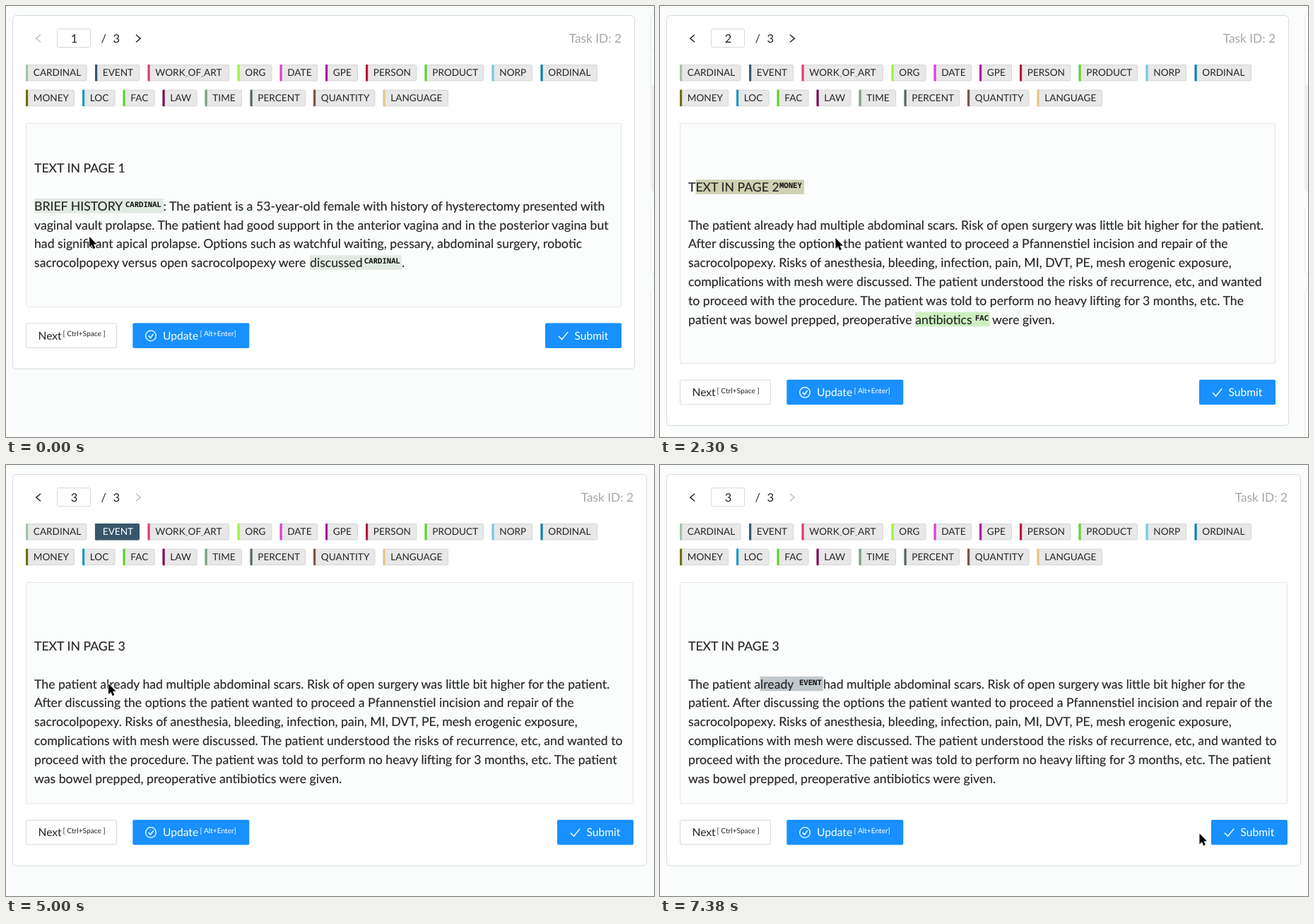
An HTML page for the animation above (7.46 s loop, 917 px wide and 611 px high).

```html
<!DOCTYPE html>
<html lang="en">
<head>
<meta charset="utf-8">
<title>Page annotation</title>
<style>
  html, body { margin: 0; width: 100%; height: 100%; overflow: hidden; background: #fafcfc; }
  svg { display: block; width: 100%; height: 100%; }
  text { font-family: Lato, sans-serif; fill: #262626; text-rendering: geometricPrecision; white-space: pre; }
  .body { font-size: 17.67px; stroke: #262626; stroke-width: .15; }
  .tag { font-size: 13.6px; }
  .tag tspan { font-size: .62em; }
  .btn { font-size: 15.6px; }
  .key { font-size: 10.2px; }
  .num { font-size: 16.5px; }
  .task { font-size: 17.3px; fill: #a6a6a6; text-anchor: end; }
  .sup { font: 600 10.6px "Noto Sans Mono", "DejaVu Sans Mono", monospace; fill: #111; }
  .light { fill: #fff; }
  .line { fill: none; stroke-width: 1.5; }
</style>
</head>
<body>
<svg id="stage" viewBox="0 0 917 611" xmlns="http://www.w3.org/2000/svg"></svg>
<script>
const LOOP = 7460, STEP = 50;

// name, colour, left, right
const TAG_ROWS = [
  [["CARDINAL", "#a3c5a5", 28, 114.5], ["EVENT", "#39566b", 126, 189], ["WORK_OF_ART", "#d8436f", 200.5, 316],
   ["ORG", "#a0f53c", 327.5, 376.5], ["DATE", "#e040d0", 387.5, 441], ["GPE", "#a81c9c", 452, 498],
   ["PERSON", "#b3163f", 509, 581.5], ["PRODUCT", "#62d42f", 592.5, 676], ["NORP", "#7cc8e8", 687.5, 745],
   ["ORDINAL", "#0f84a8", 756.5, 837]],
  [["MONEY", "#6f7009", 28, 97], ["LOC", "#1e9bc8", 108, 154.5], ["FAC", "#62d430", 165.5, 210.5],
   ["LAW", "#7a1258", 221.5, 270.5], ["TIME", "#7ba080", 281.5, 334], ["PERCENT", "#556b58", 345.5, 424],
   ["QUANTITY", "#7d5847", 435, 522.5], ["LANGUAGE", "#e4c983", 533.5, 626]]
];

const PAGES = [{ right: 871, bottom: 426.5 }, { right: 871, bottom: 506.8 }, { right: 888, bottom: 480 }];

const text = (x, y, s, cls = "body") => `<text x="${x}" y="${y}" class="${cls}">${s}</text>`;
const rect = (x, y, w, h, fill, stroke = "none", r = 0, extra = "") =>
  `<rect x="${x}" y="${y}" width="${w}" height="${h}" fill="${fill}" stroke="${stroke}" rx="${r}" ${extra}/>`;
const line = (d, color) => `<path class="line" d="${d}" stroke="${color}"/>`;
const row = n => 236.2 + 26.8 * n;
const lines = (first, list) => list.map((s, i) => text(40, row(first + i), s)).join("");
const mark = (x, end, n, color) => rect(x, row(n) - 16.8, end - x, 20.6, color);
const sup = (x, n, s) => text(x, row(n) - 5, s, "sup");

function tag([name, color, x, end], y) {
  return rect(x + .5, y + .5, end - x - 1, 22.5, "#e8e8e8", "#d6d6d6", 1.5) +
    rect(x, y, 3.2, 23.5, color) +
    text(x + 10.8, y + 16.2, name.replaceAll("_", "<tspan>_</tspan>"), "tag");
}

function frame(i) {
  const { right: R, bottom: B } = PAGES[i];
  const y = B + 23;
  const arrow = on => on ? "#222" : "#bcbcbc";
  return rect(9.5, 13.5, R + 9, B + 74.5, "#fff", "#d6dbdc", 5) +
    line("M49 40.8L42.8 46L49 51.2", arrow(i > 0)) +
    line("M184 40.8L190.2 46L184 51.2", arrow(i < 2)) +
    rect(72.5, 32.5, 47, 26, "#fff", "#d9d9d9", 2) +
    text(91.7, 52, i + 1, "num") + text(134.5, 52, "/", "num") + text(151.5, 52, "3", "num") +
    text(R, 52, "Task ID: 2", "task") +
    TAG_ROWS.map((tags, r) => tags.map(t => tag(t, 83 + 35.7 * r)).join("")).join("") +
    rect(28.5, 166.5, R - 29, B - 166.5, "#fbfcfc", "#e4e7e8", 2) +
    rect(28.5, y + .5, 128, 34.5, "#fff", "#d9d9d9", 2) +
    text(45.5, y + 23.2, "Next", "btn") + text(80.5, y + 18.8, "[ Ctrl+Space ]", "key") +
    rect(179.3, y, 165, 35.5, "#1890ff", "none", 2, 'class="update"') +
    `<circle class="line" cx="205" cy="${y + 18}" r="7.3" stroke="#fff" style="stroke-width:1.3"/>` +
    line(`M201.8 ${y + 18}l2.6 3l4.2 -5.6`, "#fff") +
    text(222, y + 23.2, "Update", "btn light") + text(274.5, y + 18.8, "[ Alt+Enter]", "key light") +
    rect(R - 108, y, 108, 35.5, "#1890ff", "none", 2) +
    line(`M${R - 89} ${y + 18.4}l4.6 4.8l8.6 -10.6`, "#fff") +
    text(R - 66.5, y + 23.2, "Submit", "btn light");
}

const sidebar =
  rect(913, 13.5, 20, 249, "#fff", "#e2e6e6", 3) + rect(914, 60, 9, 1, "#ececec") +
  rect(913.5, 112, 9, 150, "#ededed") +
  rect(913, 286, 20, 92, "#fff", "#e6e9e9", 3) +
  rect(913, 402, 20, 230, "#fff", "#e6e9e9", 3) + rect(914, 447, 9, 1, "#ececec");

const SHARED = [
  "sacrocolpopexy. Risks of anesthesia, bleeding, infection, pain, MI, DVT, PE, mesh erogenic exposure,",
  "complications with mesh were discussed. The patient understood the risks of recurrence, etc, and wanted"
];
const OPENING = [
  "The patient already had multiple abdominal scars. Risk of open surgery was little bit higher for the patient.",
  "After discussing the options the patient wanted to proceed a Pfannenstiel incision and repair of the"
];

const page1 = sidebar + frame(0) +
  mark(40, 223, 2, "#e1ebe3") + mark(430, 560, 5, "#e1ebe3") +
  text(40, row(0), "TEXT IN PAGE 1") + text(40, row(2), "BRIEF HISTORY") + sup(169, 2, "CARDINAL") +
  text(222.5, row(2), ": The patient is a 53-year-old female with history of hysterectomy presented with") +
  lines(3, [
    "vaginal vault prolapse. The patient had good support in the anterior vagina and in the posterior vagina but",
    "had significant apical prolapse. Options such as watchful waiting, pessary, abdominal surgery, robotic",
    "sacrocolpopexy versus open sacrocolpopexy were "]) +
  text(430, row(5), "discussed") + sup(507, 5, "CARDINAL") + text(560, row(5), ".");

const page2 = sidebar + frame(1) +
  mark(50.5, 204, 1, "#cfd1b3") + mark(361, 466.5, 8, "#cdf0c0") +
  text(40, row(1), "TEXT IN PAGE 2") + sup(169, 1, "MONEY") +
  lines(3, [...OPENING, SHARED[0], SHARED[1],
    "to proceed with the procedure. The patient was told to perform no heavy lifting for 3 months, etc. The",
    "patient was bowel prepped, preoperative"]) +
  text(361.3, row(8), "antibiotics") + sup(446, 8, "FAC") + text(470, row(8), "were given.");

const page3 = frame(2) + text(40, row(1), "TEXT IN PAGE 3") +
  lines(5, [SHARED[0], SHARED[1] + " to",
    "proceed with the procedure. The patient was told to perform no heavy lifting for 3 months, etc. The patient",
    "was bowel prepped, preoperative antibiotics were given."]) +
  `<g id="plain"><rect id="select" x="141.5" y="${row(3) - 17}" height="21" fill="#b4d5fe"/>${lines(3, OPENING)}</g>` +
  `<g id="labelled">${mark(141.5, 231, 3, "#c0c8cc")}${text(40, row(3), "The patient already")}${sup(197, 3, "EVENT")}` +
  text(231, row(3), "had multiple abdominal scars. Risk of open surgery was little bit higher for the") +
  text(40, row(4), "patient. After discussing the options the patient wanted to proceed a Pfannenstiel incision and repair of the") +
  `</g><g id="chosen">${rect(124.5, 82, 66, 26, "#39566b", "none", 4, 'opacity=".08"')}` +
  rect(126, 83, 63, 23.5, "#39566b", "none", 2) + text(136.8, 99.2, "EVENT", "tag light") + "</g>";

const dots = [[-10, -10], [10, -10], [10, 10], [-10, 10]]
  .map(([x, y]) => `<circle class="dot" cx="${x}" cy="${y}" r="6" fill="#1880ff"/>`).join("");

const stage = document.getElementById("stage");
stage.innerHTML = rect(0, 0, 917, 611, "#fafcfc") +
  [page1, page2, page3].map(p => `<g class="page">${p}</g>`).join("") +
  `<g id="spin">${dots}</g><circle id="ripple" fill="#808890"/>` +
  `<g id="cursor"><path d="M0 0V15L3.4 11.8L5.8 17.2L8.3 16.1L6 10.8H10.5Z" fill="#000"
    stroke="#fff" stroke-width="1.4" stroke-linejoin="round" paint-order="stroke"/></g>`;

const $ = id => document.getElementById(id);
const pages = [...stage.querySelectorAll(".page")];
const dotEls = [...stage.querySelectorAll(".dot")];
const updateEl = pages[2].querySelector(".update");
const show = (el, on) => el.style.display = on ? "" : "none";

// time, x, y
const PATH = [
  [0, 118, 327], [250, 124, 285], [500, 160, 130], [750, 180, 38], [1100, 185.5, 44.5], [1450, 185.5, 44.5],
  [1700, 220, 190], [1950, 252, 318], [2100, 248.5, 329], [2900, 248.5, 329], [3100, 228, 210], [3350, 187, 46],
  [3700, 187, 46], [4050, 190, 129], [4200, 180, 118], [4400, 156, 96], [4650, 154, 94], [4850, 194, 274],
  [5000, 145, 310], [5200, 145, 310], [5450, 196, 312], [5550, 198, 330], [5800, 218, 452], [5950, 241, 522],
  [6400, 241, 522], [6800, 264, 538], [7000, 264, 538], [7150, 430, 424], [7300, 730, 508], [7350, 763.5, 522.5]
];
const SPINS = [[1353, 1850], [3600, 4200], [6333, 6750]];
const CLICKS = [[1250, 185.5, 44.5], [3450, 187, 46], [4500, 154, 94], [6000, 241, 522]];

function cursorAt(t) {
  const i = PATH.findIndex(p => p[0] > t);
  if (i < 0) return PATH[PATH.length - 1].slice(1);
  const [t0, x0, y0] = PATH[i - 1], [t1, x1, y1] = PATH[i];
  const k = (t - t0) / (t1 - t0);
  return [x0 + (x1 - x0) * k, y0 + (y1 - y0) * k];
}

// Opacity of one dot: swings between .3 and 1 every second after its delay.
function dotOpacity(ms) {
  const p = Math.max(0, ms) % 2000 / 1000;
  return .3 + .7 * (p < 1 ? p : 2 - p);
}

function draw(t) {
  const spin = SPINS.find(([a, b]) => t >= a && t < b);
  const page = t < SPINS[0][0] ? 0 : t < SPINS[1][0] ? 1 : 2;
  pages.forEach((el, i) => show(el, !spin && i === page));

  show($("spin"), spin);
  if (spin) {
    const age = t - spin[0];
    $("spin").setAttribute("transform", `translate(647 13.3) rotate(${45 + age * .3})`);
    dotEls.forEach((el, i) => el.setAttribute("opacity", dotOpacity(age - 400 * i)));
  }

  const [x, y] = cursorAt(t);
  $("cursor").setAttribute("transform", `translate(${x} ${y})`);

  const labelled = t >= 5500;
  show($("plain"), !labelled);
  show($("labelled"), labelled);
  show($("chosen"), t >= 4550 && !labelled);
  $("select").setAttribute("width", t > 5200 ? Math.min(x, 196) - 141.5 : 0);
  updateEl.setAttribute("fill", t >= 5950 && t < 6700 ? "#40a9ff" : "#1890ff");

  const click = CLICKS.find(([a]) => t >= a && t < a + 200);
  show($("ripple"), click && !spin);
  if (click) {
    const k = (t - click[0] + STEP) / 200;
    $("ripple").setAttribute("cx", click[1]);
    $("ripple").setAttribute("cy", click[2]);
    $("ripple").setAttribute("r", 36 * k);
    $("ripple").setAttribute("opacity", .2 * (1.1 - k));
  }
}

const start = performance.now();
function tick() {
  const t = (performance.now() - start) % LOOP;
  draw(Math.floor(t / STEP) * STEP);
  requestAnimationFrame(tick);
}
tick();
</script>
</body>
</html>
```
